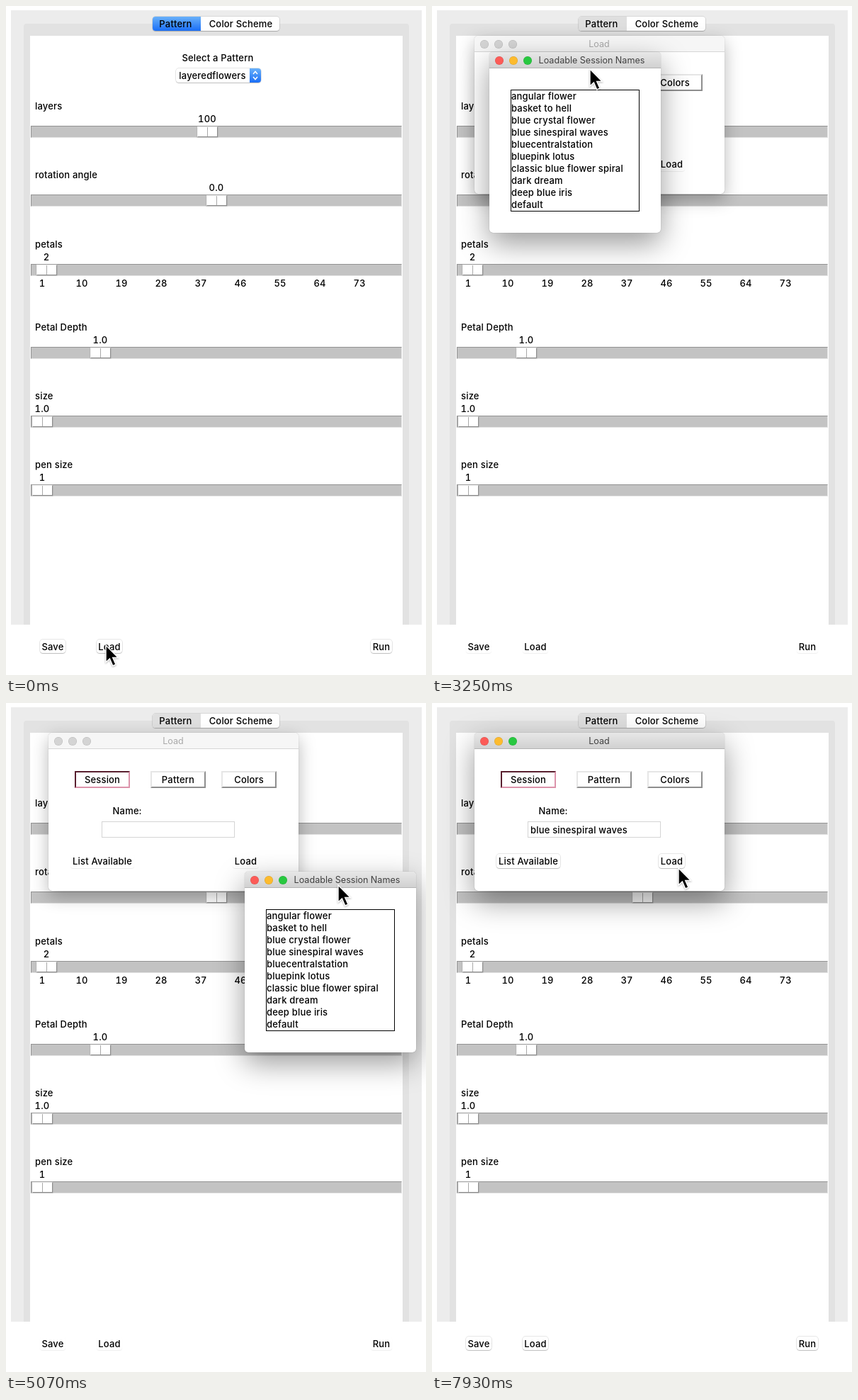
Animation, 593 px wide and 944 px high, one loop 8000 ms. Source, as an HTML page:

```html
<!DOCTYPE html>
<html lang="en">
<head>
<meta charset="utf-8">
<title>Pattern controls</title>
<style>
html, body { margin: 0; width: 100%; height: 100%; overflow: hidden; background: #fff; }
#stage { position: relative; width: 593px; height: 944px; overflow: hidden; background: #fff;
  font: 500 13px/18px Inter, "Open Sans", sans-serif; letter-spacing: .18px;
  font-variant-numeric: tabular-nums; color: #000; }
#stage div, #stage svg { position: absolute; box-sizing: border-box; }
.t { white-space: pre; }
.mid { transform: translateX(-50%); }
.btn { background: #fff; border-radius: 4px; box-shadow: 0 0 0 .7px rgba(0,0,0,.13), 0 1px 1px rgba(0,0,0,.18); }
.off .btn { box-shadow: 0 1px 1px rgba(0,0,0,.07); }
.trough { background: #c3c3c3; border: 1px solid; border-color: #929292 #e2e2e2 #e2e2e2 #929292; }
.knob { background: #fff; border: 1px solid; border-color: #f4f4f4 #8c8c8c #8c8c8c #f4f4f4; box-shadow: 0 0 0 .5px #aaa; }
.split { background: #a8a8a8; }
.tab { border-radius: 4px 0 0 4px; background: linear-gradient(#69b1fa, #1a6ef6); }
.tab.idle { background: #dfdfdf; }
.win { background: #fff; border-radius: 5px;
  box-shadow: 0 0 1px rgba(0,0,0,.45), 0 15px 42px rgba(0,0,0,.4); }
.bar { border-radius: 5px 5px 0 0; background: linear-gradient(#e7e7e7, #d1d1d1); border-bottom: 1px solid #b4b4b4; }
.name { color: #414141; font-size: 12.6px; font-weight: 400; letter-spacing: 0; }
.dot { border-radius: 50%; box-shadow: inset 0 0 0 .5px rgba(0,0,0,.15); }
.win.off { box-shadow: 0 0 1px rgba(0,0,0,.4), 0 8px 25px rgba(0,0,0,.28); }
.off .bar { background: #f6f6f6; border-color: #d6d6d6; }
.off .name { color: #a9a9a9; }
.off .dot { background: #d4d4d4 !important; }
.radio { border: 2px solid; border-color: #e6e6e6 #8e8e8e #8e8e8e #e6e6e6; }
.radio.on { border-color: #59202f #dc93ab #dc93ab #59202f; }
.entry { border: 1px solid #d4d4d4; }
.list { border: 1px solid #000; }
.pick { background: #c6f1b9; border: 1px dotted #333; }
</style>
</head>
<body>
<div id="stage"></div>
<script>
const stage = document.getElementById('stage');

function box(parent, x, y, w, h, cls = '', fill = '') {
  const el = document.createElement('div');
  el.className = cls;
  el.style.cssText = `left:${x}px;top:${y}px;width:${w}px;height:${h}px;`;
  if (fill) el.style.background = fill;
  parent.append(el);
  return el;
}

// y is the middle of the capitals
function text(parent, str, x, y, cls = '') {
  const el = document.createElement('div');
  el.className = 't ' + cls;
  el.style.cssText = `left:${x}px;top:${y - 9}px;`;
  el.textContent = str;
  parent.append(el);
  return el;
}

function button(parent, label, x, y, w, h, cls = 'btn') {
  box(parent, x, y, w, h, cls);
  text(parent, label, x + w / 2, y + h / 2, 'mid');
}

function svg(parent, x, y, w, h, body) {
  parent.insertAdjacentHTML('beforeend',
    `<svg width="${w}" height="${h}" style="left:${x}px;top:${y}px;overflow:visible">${body}</svg>`);
  return parent.lastElementChild;
}

function makeWindow(x, y, w, h, title, titleX) {
  const el = box(stage, x, y, w, h, 'win');
  box(el, 0, 0, w, 23, 'bar');
  ['#fc5b57', '#fdbb2e', '#28c840'].forEach((c, i) => box(el, 8 + i * 20, 6, 12, 12, 'dot', c));
  text(el, title, titleX, 12, 'name mid');
  return el;
}

// Main panel
box(stage, 7, 6, 580, 867, '', '#ececec');
box(stage, 25, 25, 544, 848, '', '#e2e2e2').style.borderRadius = '4px 4px 0 0';
box(stage, 34, 42, 526, 831, '', '#fff');
box(stage, 207, 15, 179, 20, 'btn');
const tab = box(stage, 207, 15, 68, 20, 'tab');
text(stage, 'Pattern', 239.5, 25, 'mid');
text(stage, 'Color Scheme', 331.5, 25, 'mid');

text(stage, 'Select a Pattern', 299, 73, 'mid');
box(stage, 240, 88, 120, 20, 'btn');
text(stage, 'layeredflowers', 291.5, 98, 'mid');
box(stage, 344, 88, 16, 20, '', 'linear-gradient(#69b1fa, #1a6ef6)').style.borderRadius = '0 4px 4px 0';
svg(stage, 344, 88, 16, 20,
  '<path d="M5 8l3-3.5 3 3.5M5 12l3 3.5 3-3.5" fill="none" stroke="#fff" stroke-width="1.5"/>');

[['layers', 141, '100', 284], ['rotation angle', 238, '0.0', 297], ['petals', 336, '2', 57],
 ['Petal Depth', 453, '1.0', 133], ['size', 550, '1.0', 51], ['pen size', 647, '1', 51]]
.forEach(([label, y, value, x]) => {
  text(stage, label, 41, y);
  text(stage, value, x, y + 18, 'mid');
  box(stage, 35, y + 28, 524, 17, 'trough');
  box(stage, x - 14, y + 29, 29, 15, 'knob');
  box(stage, x, y + 30, 1, 13, 'split');
});
for (let i = 0; i < 9; i++) text(stage, String(1 + 9 * i), 51 + 56 * i, 391, 'mid');

const footer = box(stage, 0, 880, 593, 64);
button(footer, 'Save', 48, 14, 36, 19);
button(footer, 'Load', 128, 14, 36, 19);
button(footer, 'Run', 515, 14, 30, 19);

// Load dialog
const load = makeWindow(60, 42, 353, 223, 'Load', 176);
button(load, 'Session', 37, 54, 78, 24, 'radio on');
button(load, 'Pattern', 144, 54, 78, 24, 'radio');
button(load, 'Colors', 244, 54, 78, 24, 'radio');
text(load, 'Name:', 111, 110, 'mid');
box(load, 75, 125, 188, 23, 'entry');
const typed = text(load, 'blue sinespiral waves', 79, 137);
button(load, 'List Available', 31, 171, 90, 20);
button(load, 'Load', 260, 171, 37, 20);

// Session list
const names = makeWindow(81, 65, 242, 255, 'Loadable Session Names', 144.5);
box(names, 30, 53, 182, 172, 'list');
const pick = box(names, 31, 105, 180, 17, 'pick');
['angular flower', 'basket to hell', 'blue crystal flower', 'blue sinespiral waves', 'bluecentralstation',
 'bluepink lotus', 'classic blue flower spiral', 'dark dream', 'deep blue iris', 'default']
.forEach((s, i) => text(names, s, 31, 62 + 17 * i));

const cursor = svg(stage, 0, 0, 20, 30,
  '<path d="M0-1V23L5.4 18 9.8 28 14 26.2 9.7 16.5H17.3Z" fill="#000" stroke="#fff" stroke-width="1.4"/>');
cursor.style.filter = 'drop-shadow(0 1px 1px rgba(0,0,0,.3))';

// Tables of [step, x, y]
const TICK = 130, LOOP = 8000;
const OPEN = 3, LIST = 16, PICK = 48, CLOSE = 60;
const drag = [[28, 81, 65], [29, 98, 72], [32, 280, 147], [34, 368, 183], [35, 360, 198], [36, 345, 225], [37, 337, 238]];
const path = [[0, 141, 903], [2, 141, 903], [5, 190, 640], [7, 260, 344], [8, 258, 336], [11, 185, 258],
  [13, 135, 226], [17, 135, 226], [22, 205, 118], [25, 223, 90], [27, 217, 74],
  ...drag.map(([s, x, y]) => [s, x + 136, y + 9]),
  [39, 469, 258], [42, 446, 245], [43, 384, 403], [45, 384, 403], [47, 420, 356], [48, 430, 349],
  [50, 430, 349], [53, 389, 265], [56, 352, 251], [59, 351, 250], [60, 350, 245], [61, 348, 234]];

function at(keys, s) {
  if (s <= keys[0][0]) return keys[0].slice(1);
  const i = keys.findIndex(k => k[0] >= s);
  if (i < 0) return keys[keys.length - 1].slice(1);
  const a = keys[i - 1], b = keys[i], p = (s - a[0]) / (b[0] - a[0]);
  return [a[1] + (b[1] - a[1]) * p, a[2] + (b[2] - a[2]) * p];
}

const show = (el, on) => { el.style.visibility = on ? 'visible' : 'hidden'; };

function place(el, [x, y]) {
  el.style.left = Math.round(x) + 'px';
  el.style.top = Math.round(y) + 'px';
}

function draw() {
  const s = Math.floor(performance.now() % LOOP / TICK);
  const listed = s >= LIST && s < CLOSE;
  tab.classList.toggle('idle', s >= OPEN);
  show(load, s >= OPEN);
  show(names, listed);
  show(typed, s >= PICK);
  show(pick, listed && s >= PICK);
  load.classList.toggle('off', listed);
  footer.classList.toggle('off', listed);
  place(names, at(drag, s));
  place(cursor, at(path, s));
  requestAnimationFrame(draw);
}
draw();
</script>
</body>
</html>
```
